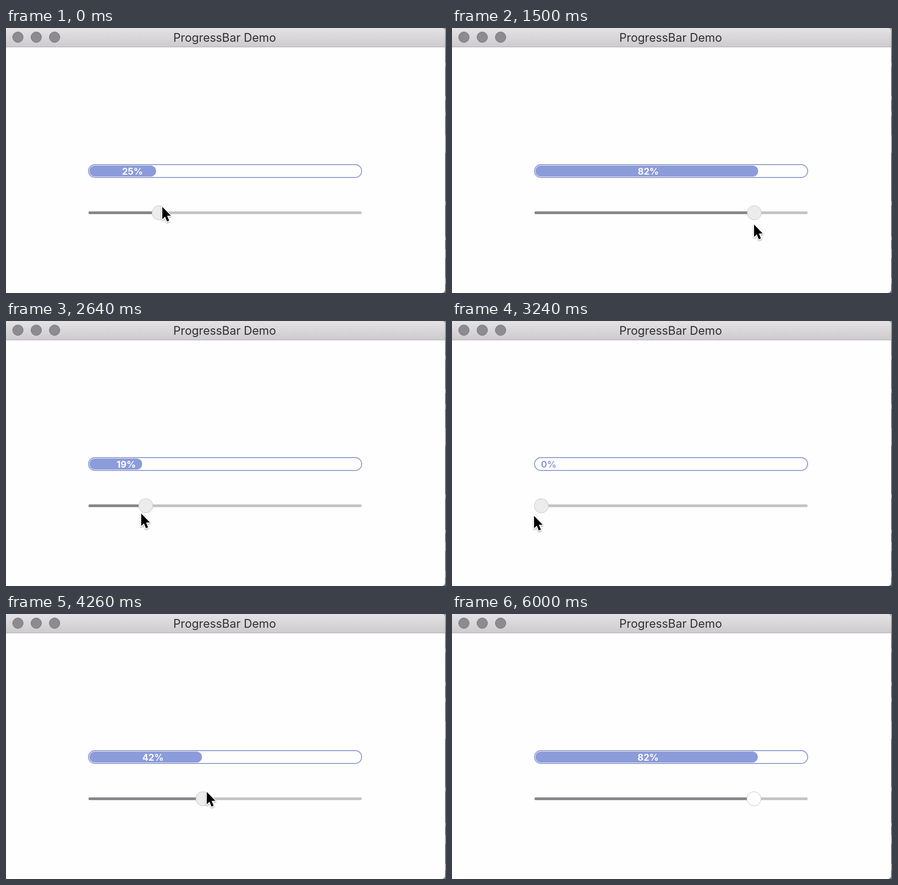
These frames come from a looping animation (960 px wide and 578 px high, 6060 ms). An HTML page:

```html
<!DOCTYPE html>
<html lang="en">
<head>
<meta charset="utf-8">
<title>ProgressBar Demo</title>
<style>
  html, body { margin: 0; width: 100%; height: 100%; overflow: hidden; background: #fefefe; }
  svg { display: block; width: 960px; height: 578px; font-family: Inter, sans-serif; }
  .label { font-size: 20px; font-weight: 700; text-anchor: middle; }
</style>
</head>
<body>
<svg viewBox="0 0 960 578">
  <defs>
    <linearGradient id="titlebar" x2="0" y2="1">
      <stop stop-color="#e4e2e4"/><stop offset="1" stop-color="#cdcbcd"/>
    </linearGradient>
    <linearGradient id="desktop" x2="0" y2="1">
      <stop stop-color="#86a79c"/><stop offset=".12" stop-color="#5f8580"/>
      <stop offset=".25" stop-color="#56807b"/><stop offset=".4" stop-color="#6f7f70"/>
      <stop offset=".5" stop-color="#4f7774"/><stop offset="1" stop-color="#5b7f7a"/>
    </linearGradient>
    <clipPath id="fillClip"><rect class="fill" x="182" y="300" height="24" rx="12"/></clipPath>
    <filter id="soft" x="-50%" y="-50%" width="200%" height="200%">
      <feDropShadow dx="0" dy="2" stdDeviation="1.5" flood-opacity=".35"/>
    </filter>
  </defs>

  <rect x="940" width="20" height="578" fill="url(#desktop)"/>
  <path d="M959 75v9M959 148v9M959 182v10M959 234v38M959 378v9M959 455v8M959 482v20M959 545v14"
        stroke="#b09a70" stroke-width="2"/>
  <path d="M0 0H950Q958 0 958 8V570Q958 578 950 578H0Z" fill="#fefefe"/>
  <path d="M0 41V4Q0 0 4 0H950Q958 0 958 8V41Z" fill="url(#titlebar)"/>
  <path d="M0 41.5H958" stroke="#a9a8a9"/>
  <g fill="#8c8b8f" stroke="#747377">
    <circle cx="26" cy="20" r="11.5"/><circle cx="66" cy="20" r="11.5"/><circle cx="106" cy="20" r="11.5"/>
  </g>
  <text x="477" y="30" font-size="25.3" text-anchor="middle" fill="#302f31">ProgressBar Demo</text>

  <rect x="180" y="298" width="596" height="28" rx="14" fill="#fefefe" stroke="#8c9ad0" stroke-width="2"/>
  <text class="label" y="320" fill="#8c9bd9"></text>
  <rect class="fill" x="182" y="300" height="24" rx="12" fill="#8c9bd9"/>
  <g clip-path="url(#fillClip)"><text class="label" y="320" fill="#fefefe"></text></g>

  <rect x="180" y="400" width="596" height="6" rx="3" fill="#c4c4c4"/>
  <rect id="trackDone" x="180" y="400" height="6" rx="3" fill="#87868b"/>
  <circle id="thumb" cy="403" r="15.5" stroke="#c3c3c3"/>

  <path id="cursor" d="M1 1V28L7 22.3L11.3 33L16 31L11.5 20.6H20Z" fill="#000" stroke="#fff"
        stroke-width="3.5" paint-order="stroke" stroke-linejoin="round" filter="url(#soft)"/>
</svg>
<script>
const LOOP = 6060, STEP = 60, RELEASE = 5340, CURSOR_GONE = 5880;

// time, progress, cursor x, cursor y
const keys = [
  [0, .246, 340, 389], [120, .29, 364, 391], [540, .93, 726, 408], [660, 1, 766, 415],
  [780, 1, 762, 419], [1140, 1, 762, 424], [1260, .96, 737, 426], [1980, .547, 500, 431],
  [2640, .1947, 294, 419], [3000, 0, 181, 421], [3240, 0, 178, 424], [3660, 0, 177, 414],
  [3840, .06, 236, 400], [4260, .4155, 437, 387], [4560, .76, 632, 391], [4740, .821, 666, 394],
  [RELEASE, .821, 666, 394], [CURSOR_GONE, .821, 315, 580], [LOOP, .821, 315, 580]
];

const all = selector => document.querySelectorAll(selector);
const [fills, labels] = [all('.fill'), all('.label')];
const [trackDone, thumb, cursor] = ['#trackDone', '#thumb', '#cursor'].map(s => all(s)[0]);

function poseAt(time) {
  const next = keys.findIndex(key => key[0] > time);
  const a = keys[next - 1], b = keys[next];
  const part = (time - a[0]) / (b[0] - a[0]);
  return a.map((value, i) => value + (b[i] - value) * part);
}

function draw(now) {
  const time = Math.floor(now % LOOP / STEP) * STEP;
  const [, progress, x, y] = poseAt(time);
  const thumbX = 195 + 565 * progress;

  for (const fill of fills) fill.setAttribute('width', 591 * progress);
  for (const label of labels) {
    label.setAttribute('x', 211 + 263.5 * progress + 3 * progress ** 9);
    label.textContent = Math.round(progress * 100) + '%';
  }
  trackDone.setAttribute('width', thumbX - 180);
  thumb.setAttribute('cx', thumbX);
  thumb.setAttribute('fill', time < RELEASE ? '#ececec' : '#fefefe');
  cursor.setAttribute('transform', `translate(${x} ${y})`);
  cursor.setAttribute('visibility', time < CURSOR_GONE ? 'visible' : 'hidden');
}

const start = performance.now();
function tick() {
  draw(performance.now() - start);
  requestAnimationFrame(tick);
}
tick();
</script>
</body>
</html>
```
